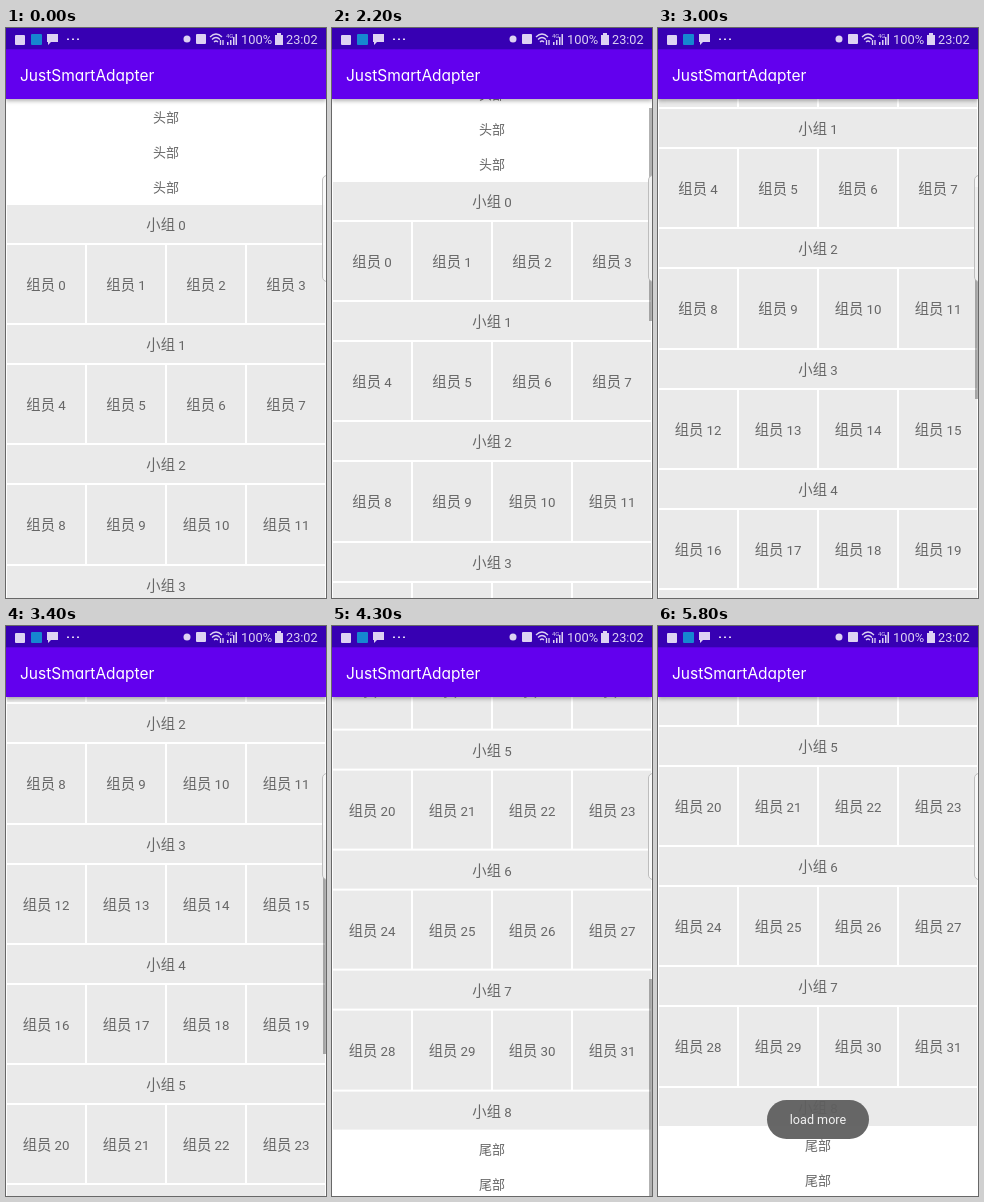
These frames come from a looping animation (320x570 px, 5900 ms). An HTML page:

```html
<!DOCTYPE html>
<html lang="zh-CN">
<head>
<meta charset="utf-8">
<title>JustSmartAdapter</title>
<style>
html, body { margin: 0; width: 100%; height: 100%; overflow: hidden; background: #fff; }
#stage { position: relative; width: 320px; height: 570px; overflow: hidden; background: #fff;
  font-family: "Noto Sans CJK SC", "Noto Sans CJK", "Noto Sans", sans-serif; color: #666; }
#stage div { position: absolute; box-sizing: border-box; }
#view { left: 0; top: 71px; width: 320px; height: 499px; overflow: hidden; }
#list { left: 0; top: 0; width: 320px; }
.cell { background: #eaeaea; font-size: 14.3px; text-align: center; white-space: nowrap; }
.cell span { font: 13.3px/0 Roboto, sans-serif; }
.note { left: 0; width: 320px; height: 35px; line-height: 35px; font-size: 13px; text-align: center; }
#glow { left: -360px; width: 1130px; height: 1130px; border-radius: 50%; background: #6200ee; }
#thumb { left: 317px; width: 3px; background: #000; }
#handle { left: 316px; top: 147px; width: 10px; height: 107px; border: 1px solid #bdbdbd;
  border-radius: 6px; background: rgba(250, 250, 250, .88); }
#bar { left: 0; top: 0; width: 320px; height: 71px; background: #6200ee; box-shadow: 0 2px 4px rgba(0, 0, 0, .3); }
#title { left: 14px; top: 36px; font: 400 15.5px/24px Inter, sans-serif;
  font-feature-settings: "cv11"; color: #fff; white-space: nowrap; }
#status { left: 0; top: 0; }
#toast { left: 109px; top: 474px; width: 102px; height: 39px; border-radius: 20px; background: rgba(95, 95, 95, .95);
  color: #f2f2f2; font: 12.6px/39px Roboto, sans-serif; text-align: center; }
</style>
</head>
<body>
<div id="stage">
  <div id="view"><div id="list"></div></div>
  <div id="glow"></div>
  <div id="thumb"></div>
  <div id="bar">
    <svg id="status" width="320" height="22" fill="#ddd2f3">
      <rect width="320" height="21.300" fill="#3700b3"/>
      <rect x="9" y="7" width="10" height="10" rx="1"/>
      <rect x="25" y="6" width="11" height="11" rx="1" fill="#1687d0"/>
      <path d="M41 6h11v8h-7l-3 3v-3h-1z"/>
      <path d="M61 10.500h2v1.500h-2zM66 10.500h2v1.500h-2zM71 10.500h2v1.500h-2z"/>
      <circle cx="181" cy="11" r="3.500"/>
      <rect x="190" y="6" width="10" height="10" rx="1"/>
      <g fill="none" stroke="#ddd2f3" stroke-width="1.300">
        <path d="M204 9q6-6 12 0M206 11.500q4-4 8 0M208 14q2-2 4 0"/>
        <path d="M214.500 12v5M217 12v5"/>
      </g>
      <path d="M221 14h1.500v3h-1.500zM224 12h1.500v5h-1.500zM227 9h1.500v8h-1.500zM229.500 6h1.500v11h-1.500z"/>
      <path d="M269 7h2v-2h4v2h2v10h-8z"/>
      <g font-family="Roboto, sans-serif">
        <text x="220" y="10" font-size="6">4G</text>
        <text x="235" y="16" font-size="12.900">100%</text>
        <text x="280" y="16" font-size="12.700">23:02</text>
      </g>
    </svg>
    <div id="title">JustSmartAdapter</div>
  </div>
  <div id="handle"></div>
  <div id="toast">load more</div>
</div>
<script>
const LOOP = 5900, STEP = 100, HEADER = 105, PITCH = 120.2, GROUPS = 9;
const $ = id => document.getElementById(id);
const [list, glow, thumb, toast] = ['list', 'glow', 'thumb', 'toast'].map($);

function add(cls, text, style) {
  const el = document.createElement('div');
  el.className = cls;
  el.textContent = text;
  Object.assign(el.style, style);
  list.append(el);
  return el;
}

function cell(label, n, x, y, w, h) {
  const num = document.createElement('span');
  num.textContent = n;
  add('cell', label + ' ', {
    left: x + 1 + 'px', top: y + 1 + 'px', width: w - 2 + 'px',
    height: h - 2 + 'px', lineHeight: h - 2 + 'px'
  }).append(num);
}

for (let i = 0; i < 3; i++) add('note', '头部', { top: i * 35 + 'px' });
for (let g = 0; g < GROUPS; g++) {
  const y = HEADER + g * PITCH;
  cell('小组', g, 0, y, 320, 40);
  if (g < GROUPS - 1)
    for (let c = 0; c < 4; c++) cell('组员', g * 4 + c, c * 80, y + 40, 80, 80.2);
}
const end = HEADER + (GROUPS - 1) * PITCH + 40;
for (let i = 0; i < 2; i++) add('note', '尾部', { top: end + i * 35 + 'px' });

// Monotone cubic through [x, y] points
function curve(pts) {
  const rate = pts.slice(1).map((p, i) => (p[1] - pts[i][1]) / (p[0] - pts[i][0]));
  const slope = pts.map((p, i) => {
    const a = rate[i - 1], b = rate[i];
    if (a === undefined) return b;
    if (b === undefined) return 0;
    return a * b > 0 ? 2 * a * b / (a + b) : 0;
  });
  return x => {
    if (x <= pts[0][0]) return pts[0][1];
    const i = pts.findIndex(p => p[0] >= x) - 1;
    if (i < 0) return pts[pts.length - 1][1];
    const [x0, y0] = pts[i], [x1, y1] = pts[i + 1];
    const h = x1 - x0, u = (x - x0) / h, v = 1 - u;
    return y0 * v * v * (1 + 2 * u) + y1 * u * u * (3 - 2 * u)
      + h * u * v * (slope[i] * v - slope[i + 1] * u);
  };
}

const scrollAt = curve([[2100, 0], [2200, 23], [3000, 216], [3400, 339], [3900, 597], [4200, 665], [4400, 677]]);
const thumbTop = curve([[0, 71], [23, 80], [216, 159], [339, 214], [597, 326], [677, 353.5]]);
const thumbEnd = curve([[0, 284], [23, 293], [216, 371], [339, 428], [597, 545], [677, 570]]);
const ramp = (t, a, b) => Math.min(1, Math.max(0, (t - a) / (b - a)));

function render(t) {
  const s = scrollAt(t), top = thumbTop(s);
  list.style.transform = `translateY(${-s}px)`;

  thumb.style.top = top + 'px';
  thumb.style.height = thumbEnd(s) - top + 'px';
  thumb.style.opacity = t < 2200 ? 0 : .3 * (1 - ramp(t, 5400, 5800));

  const pull = ramp(t, 4300, 5000), fade = 1 - ramp(t, 5100, 5700);
  glow.style.top = 570 - 51 * Math.sqrt(pull) * fade + 'px';
  glow.style.opacity = .17 * pull * fade;

  toast.style.opacity = ramp(t, 5100, 5500);
}

const start = performance.now();
function tick() {
  const t = (performance.now() - start) % LOOP;
  render(Math.floor(t / STEP) * STEP);
  requestAnimationFrame(tick);
}
tick();
</script>
</body>
</html>
```
